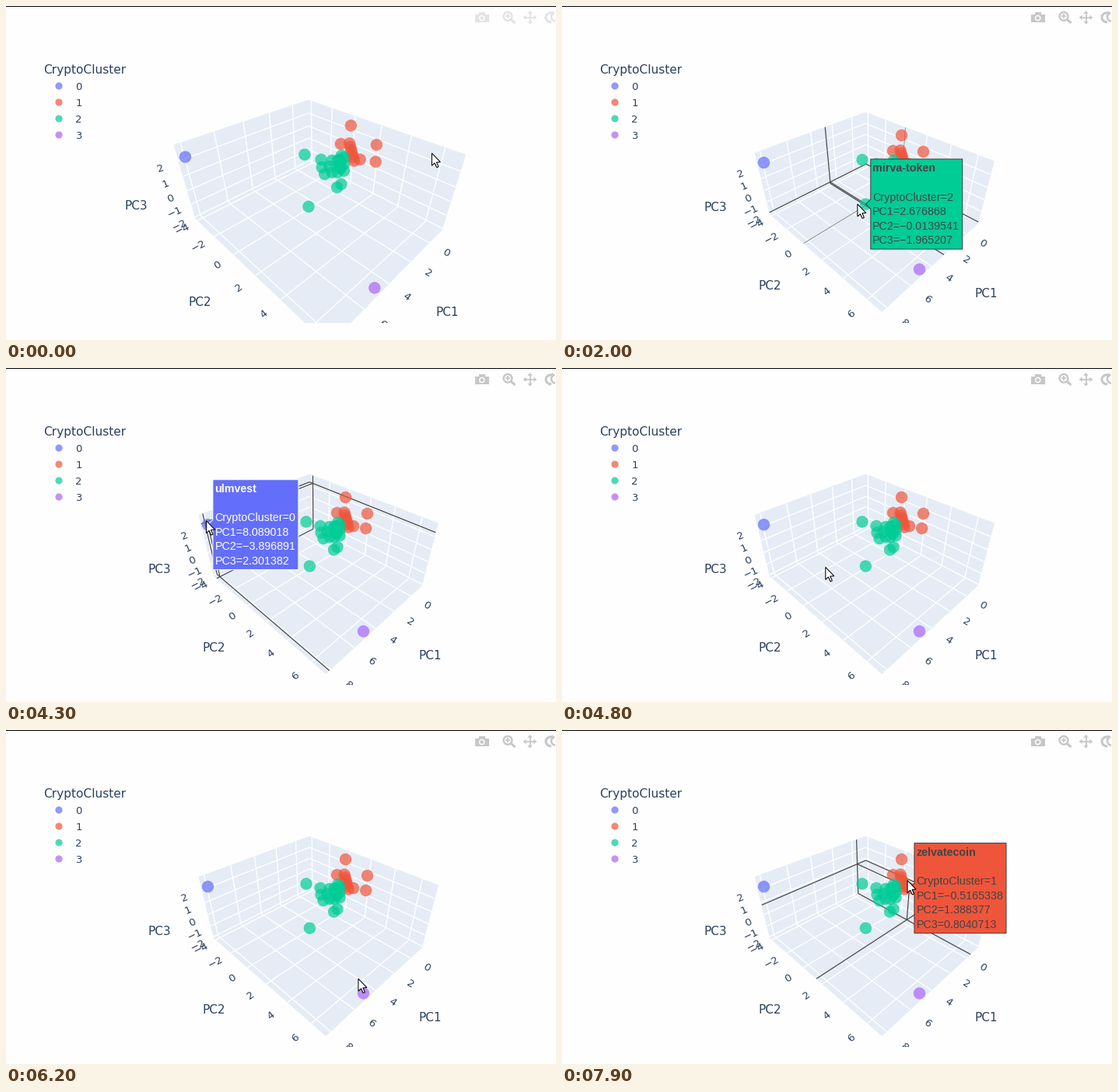
Recreate the animation shown at these times as a matplotlib script. Size 707 px wide and 430 px high, loop 8000 ms.

```python
import numpy as np
import matplotlib.pyplot as plt
from matplotlib.animation import FuncAnimation
from matplotlib.collections import LineCollection
from matplotlib.patches import Arc, Circle, Polygon, Rectangle

W, H, DPI = 707, 430, 100
STEP, FRAMES = 100, 80
INK, DARK, PLANE, PAPER = "#2a3f5f", "#444444", "#e5ecf6", "#fefefe"
COLORS = ["#636efa", "#ef553b", "#00cc96", "#ab63fa"]

# Perspective camera looking at the middle of the box
CX, CY, FOCAL, SCALE = 398.3, 236.8, 400, 0.0476
VIEW = np.array([[-1, 1, 0], [-1, -1, 2], [1, 1, 1]]) / np.sqrt([[2], [6], [3]])
MID = np.array([3.42, 1.392, 0.43])
HALF = np.array([0.235, 0.2705, 0.121]) / SCALE
LO, HI = MID - HALF, MID + HALF
TICKS = [range(0, 9, 2), range(-4, 7, 2), range(-2, 3)]
NEAR, FAR, ZOOM_AT = 0.833, 1.0, 700

# name, cluster, PC1, PC2, PC3
COINS = [
    ("mirva-token", 2, 2.676868, -0.0139541, -1.965207),
    ("ulmvest", 0, 8.089018, -3.896891, 2.301382),
    ("velquor-sector-token", 3, 4.792395, 6.767679, -1.986985),
    ("tavuro", 1, 0.06049915, 2.909404, 1.498571),
    ("zelvatecoin", 1, -0.5165338, 1.388377, 0.8040713),
]

# Pointer: start time, end time, coin it goes to, offset from that coin
START, PARK = np.array([547.4, 189.5]), np.array([545, 244])
MOVES = [
    (1400, 2000, 0, (-10.5, 0)), (2000, 2300, 0, (6.5, 6)), (2500, 2700, 0, (3, 3)),
    (2800, 3500, 1, (-2, -5)), (4400, 5300, 2, (-7, 1)), (6000, 6800, 3, (-7.5, 7)),
    (6900, 7200, 3, (-7, 1)), (7600, 7900, 4, (-2.5, -10)),
]
ARROW = np.array([(0, 0), (0, 16), (3.6, 12.6), (6.2, 18.4), (8.5, 17.4),
                  (6, 11.7), (11, 11.4)])


def project(p, dist):
    right, up, out = VIEW @ ((np.asarray(p, float) - MID) * SCALE)
    k = FOCAL / (dist - out)
    return np.array([CX + k * right, CY - k * up])


def unproject(x, y, depth):
    v = np.array([(x - CX) * depth / FOCAL, (CY - y) * depth / FOCAL, FAR - depth])
    return VIEW.T @ v / SCALE + MID


def with_axis(p, axis, value):
    q = np.array(p, float)
    q[axis] = value
    return q


def scatter_points():
    """Clusters as outliers plus a red streak, a green ring and a green column."""
    reds = [(436.5, 166.5), (464.5, 187.5), (425.5, 186.5)]
    reds += zip(np.linspace(435, 440, 6), np.linspace(186, 205, 6))
    greens = [(386, 198), (404, 203.5), (405, 212), (408, 219.5), (421.5, 234), (426, 230.5)]
    turn = np.arange(6) * np.pi / 3
    greens += zip(419 + 6 * np.cos(turn), 211 + 7.5 * np.sin(turn))
    i = np.arange(8)
    greens += zip(426.5 + 2.5 * np.sin(2 * i), 199 + 2.4 * i)
    pts = [(1, unproject(x, y, 1.1)) for x, y in reds]
    pts += [(2, unproject(x, y, 1.13)) for x, y in greens]
    pts += [(c[1], c[2:]) for c in COINS]
    return sorted(pts, key=lambda p: p[0])


POINTS = scatter_points()

fig = plt.figure(figsize=(W / DPI, H / DPI), dpi=DPI, facecolor=PAPER)
ax = fig.add_axes([0, 0, 1, 1])


def label(x, y, s, px, color=INK, family="DejaVu Sans", **kw):
    return ax.text(x, y, s, fontsize=px * 72 / DPI, color=color, family=family, **kw)


def lines(segs, color, width, z, clip):
    c = LineCollection(segs, colors=color, linewidths=np.asarray(width) * 72 / DPI, zorder=z)
    ax.add_collection(c, autolim=False)
    c.set_clip_path(clip)


def draw_box(dist, clip):
    for axis in range(3):
        u, v = [k for k in range(3) if k != axis]
        corners = [LO, with_axis(LO, u, HI[u]),
                   with_axis(with_axis(LO, u, HI[u]), v, HI[v]), with_axis(LO, v, HI[v])]
        face = Polygon([project(p, dist) for p in corners], fc=PLANE, ec=PLANE, lw=0.4, zorder=1)
        ax.add_patch(face)
        face.set_clip_path(clip)
    grid = []
    for axis, ticks in enumerate(TICKS):
        for v in ticks:
            a = with_axis(LO, axis, v)
            for other in {0, 1, 2} - {axis}:
                b = with_axis(a, other, HI[other])
                grid.append((project(a, dist), project(b, dist)))
    lines(grid, "white", 1.4, 2, clip)


def draw_axis_text(dist, clip):
    edges = [((0, HI[1], LO[2]), 1), ((HI[0], 0, LO[2]), 0), ((HI[0], LO[1], 0), 0)]
    for axis, (edge, out) in enumerate(edges):
        def place(value, gap, text, size, tilted):
            p = with_axis(edge, axis, value)
            base = project(p, dist)
            x, y = project(with_axis(p, out, p[out] + gap * dist / SCALE), dist)
            tilt = np.degrees(np.arctan((base[1] - y) / (x - base[0]))) if tilted else 0
            label(x, y + 1.3, text, size, rotation=tilt, ha="center", va="center",
                  zorder=5, clip_on=True).set_clip_path(clip)

        for v in TICKS[axis]:
            place(v, 0.057, f"{v}".replace("-", "−"), 13.4, True)
        place(MID[axis], 0.156, f"PC{axis + 1}", 15.2, False)


def draw_spikes(p, dist, clip):
    pairs, widths = [], []
    for axis in range(3):
        corner = with_axis(LO, axis, p[axis])
        pairs.append((p, with_axis(p, axis, LO[axis])))
        widths.append(1.2)
        for other in {0, 1, 2} - {axis}:
            pairs.append((corner, with_axis(corner, other, HI[other])))
            # a spike lying on a grid line comes out faint
            widths.append(0.6 if abs(p[axis]) < 0.03 else 1.2)
    lines([(project(a, dist), project(b, dist)) for a, b in pairs], DARK, widths, 3, clip)


def draw_tooltip(coin, dist):
    name, cluster, *pcs = coin
    px, py = project(pcs, dist)
    left, top, bottom = px + 6.4, py - 58, py + 58
    color = "white" if cluster == 0 else DARK
    rows = [name, "", f"CryptoCluster={cluster}"]
    rows += [f"PC{i}={v:.7g}".replace("-", "−") for i, v in enumerate(pcs, 1)]
    width = 0
    for i, row in enumerate(rows):
        if row:
            t = label(left + 2.6, top + 16.4 + 18.6 * i, row, 14.3, color, "Liberation Sans",
                      weight="normal" if i else "bold", va="baseline", zorder=8)
            box = t.get_window_extent().transformed(ax.transData.inverted())
            width = max(width, abs(box.width))
    right = left + width + 6.2
    shape = [(left, top), (right, top), (right, bottom), (left, bottom),
             (left, py + 6.3), (px, py), (left, py - 6.3)]
    ax.add_patch(Polygon(shape, fc=COLORS[cluster], ec=color, lw=0.75, zorder=7))


def draw_legend():
    label(48, 87, "CryptoCluster", 15.4)
    for i, color in enumerate(COLORS):
        y = 103 + 21 * i
        ax.add_patch(Circle((68, y), 4.6, fc=color, alpha=0.7, lw=0))
        label(89.5, y + 5, str(i), 13.1)


def draw_modebar(alpha):
    g = (1 - alpha * 0.733,) * 3

    def stroke(xs, ys, w):
        ax.plot(xs, ys, color=g, lw=w * 0.72, solid_capstyle="butt")

    def disc(x, y, r, color):
        ax.add_patch(Circle((x, y), r, fc=color, lw=0, zorder=3))

    def head(x, y, dx, dy):
        tip, back, side = np.array([x, y]), np.array([dx, dy]) * 3.8, np.array([dy, dx]) * 3.2
        ax.add_patch(Polygon([tip, tip - back + side, tip - back - side], fc=g, lw=0))

    # camera
    ax.add_patch(Rectangle((603, 10.5), 17.5, 10.5, fc=g, lw=0))
    ax.add_patch(Rectangle((608, 8), 7.5, 3, fc=g, lw=0))
    disc(611.7, 15.5, 3.8, PAPER)
    disc(611.7, 15.5, 2.3, g)
    # zoom
    ax.add_patch(Circle((645, 13.3), 5.4, fc="none", ec=g, lw=1.7))
    stroke([642, 648], [13.3, 13.3], 1.8)
    stroke([645, 645], [10.3, 16.3], 1.8)
    stroke([648.8, 654.5], [17, 22], 3)
    # pan
    stroke([666, 681], [14.8, 14.8], 1.8)
    stroke([673.5, 673.5], [7.5, 22], 1.8)
    for dx, dy in ((1, 0), (-1, 0), (0, 1), (0, -1)):
        head(673.5 + 8.8 * dx, 14.8 + 8.8 * dy, dx, dy)
    # orbit
    ax.add_patch(Arc((700.5, 14.8), 13, 12, theta1=85, theta2=290, ec=g, lw=2.2))
    ax.add_patch(Arc((706, 14), 10, 11, theta1=90, theta2=230, ec=g, lw=1.8))
    head(706, 9.3, 1, 0)


def ease(u):
    u = np.clip(u, 0, 1)
    return u * u * (3 - 2 * u)


def pointer(t):
    pos = START + (PARK - START) * ease(t / 400)
    for start, end, coin, offset in MOVES:
        goal = project(COINS[coin][2:], FAR) + offset
        pos = pos + (goal - pos) * ease((t - start) / (end - start))
    return pos


def draw(frame):
    t = frame * STEP
    dist = NEAR if t < ZOOM_AT else FAR
    ax.cla()
    ax.set(xlim=(0, W), ylim=(H, 0))
    ax.axis("off")
    clip = Rectangle((0, 0), W, 408, transform=ax.transData)

    draw_box(dist, clip)
    tip = pointer(t)
    gaps = [np.hypot(*(project(c[2:], dist) - tip)) for c in COINS]
    nearest = int(np.argmin(gaps))
    if gaps[nearest] < 13:
        draw_spikes(COINS[nearest][2:], dist, clip)
        draw_tooltip(COINS[nearest], dist)

    xy = np.array([project(p, dist) for _, p in POINTS])
    ax.scatter(xy[:, 0], xy[:, 1], s=(15.4 * 72 / DPI) ** 2, linewidths=0, alpha=0.7,
               c=[COLORS[k] for k, _ in POINTS], zorder=4)
    draw_axis_text(dist, clip)
    draw_legend()
    draw_modebar(np.interp(t, [0, 400], [0.15, 0.3]))
    ax.add_patch(Polygon(ARROW + tip, fc="white", ec="black", lw=0.75, zorder=10))
    ax.add_patch(Rectangle((0, 0), W, 1, fc="black", lw=0, zorder=11))
    # plotting can rescale the axes, so pin the stage again
    ax.set(xlim=(0, W), ylim=(H, 0))
    return []


anim = FuncAnimation(fig, draw, frames=FRAMES, init_func=lambda: [], interval=STEP,
                     repeat=True, repeat_delay=0, blit=False)
plt.show()
```
